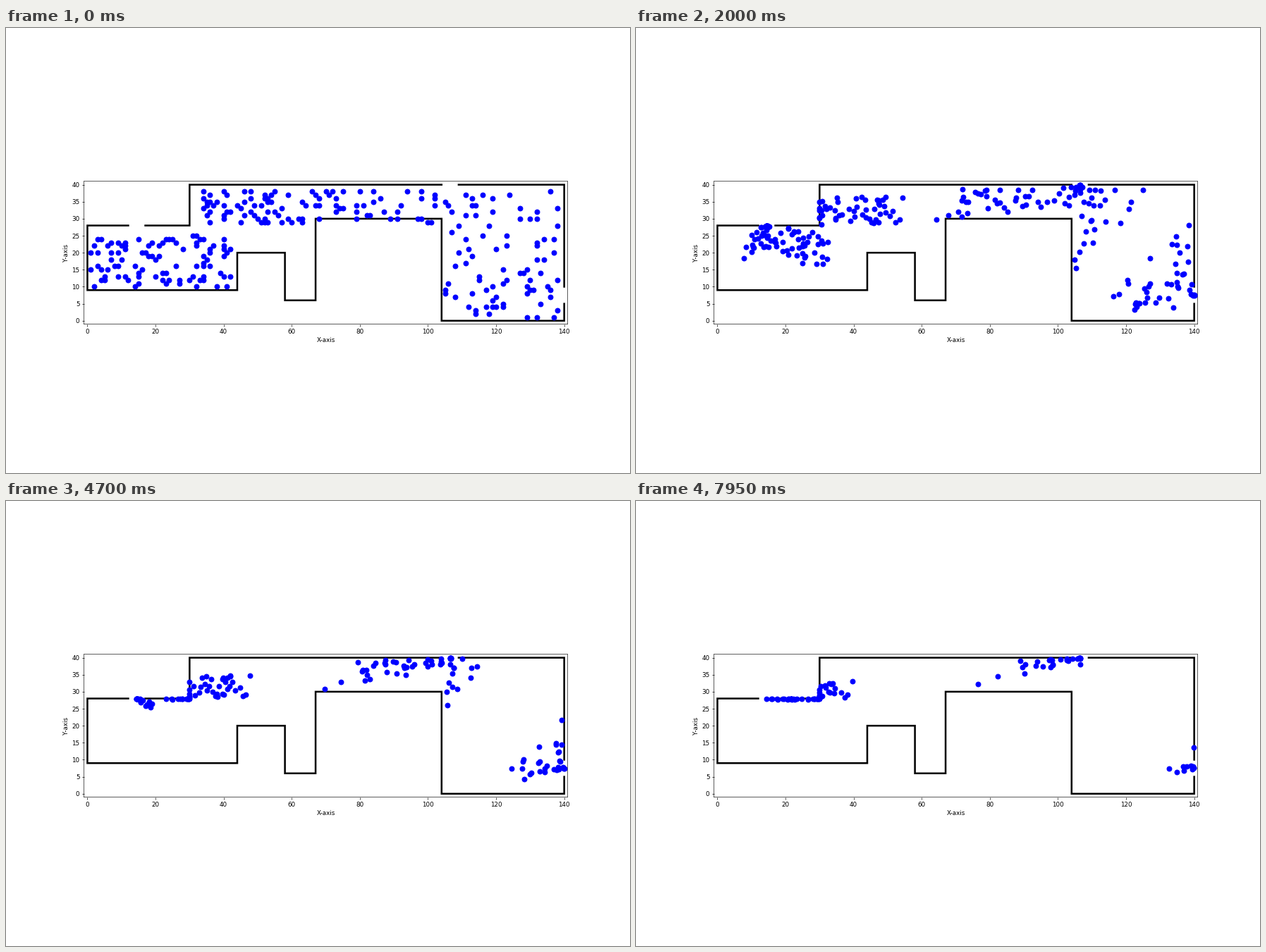
A matplotlib script for the animation above (8000 ms loop, 885 px wide and 632 px high).

```python
import numpy as np
import matplotlib.pyplot as plt
from matplotlib.animation import FuncAnimation

DPI = 63.2
FRAMES, STEP = 160, 50
DT = STEP / 1000
DOORS = np.array([(14.5, 28.0), (106.5, 40.0), (140.0, 7.5)])
WALLS = [
    [(12, 28), (0, 28), (0, 9), (44, 9), (44, 20), (58, 20), (58, 6), (67, 6),
     (67, 30), (104, 30), (104, 0), (140, 0), (140, 5)],
    [(17, 28), (30, 28), (30, 40), (104, 40)],
    [(109, 40), (140, 40), (140, 10)],
]

# Each area: walkers, x range, y range, speed range in units per second
AREAS = [
    (92, (1, 42), (10, 25), (4.8, 6.2)),
    (50, (33, 59), (29, 38), (2.5, 2.95)),
    (46, (60, 102), (29, 38), (2.0, 5.0)),
    (82, (105, 138), (1, 38), (2.0, 5.5)),
]


def nearest_door(pos):
    if 60 <= pos[0] < 104:
        return 1
    return int(np.argmin(np.hypot(*(DOORS - pos).T)))


def place(count, xs, ys, rng):
    """Distinct whole-number positions inside a rectangle."""
    width = xs[1] - xs[0] + 1
    cells = rng.choice(width * (ys[1] - ys[0] + 1), count, replace=False)
    return np.column_stack((xs[0] + cells % width, ys[0] + cells // width)).astype(float)


def walk(pos, speed, rng):
    """Positions of one walker per frame, NaN once it has left."""
    door = nearest_door(pos)
    path = np.full((FRAMES, 2), np.nan)
    wait = rng.uniform(0.1, 0.9)
    stride = speed * DT
    for i in range(FRAMES):
        path[i] = pos
        gap = DOORS[door] - pos
        dist = np.hypot(*gap)
        noise = rng.normal(0, 0.04, 2)
        if dist < 0.45:
            wait -= DT
            if wait < 0:
                break
            new = pos + 0.2 * gap + noise
        else:
            new = pos + gap / dist * min(stride, dist) + noise
            # Slide down the corridor's end wall until the room below opens
            if new[0] < 30 <= pos[0] and pos[1] > 28:
                new = np.array([30, max(pos[1] - stride, 28)])
        pos = np.minimum(new, (140, 28 if new[0] < 30 else 40))
    return path


rng = np.random.default_rng(12)
paths = np.array([walk(start, rng.uniform(*speeds), rng)
                  for count, xs, ys, speeds in AREAS
                  for start in place(count, xs, ys, rng)])

fig, ax = plt.subplots(figsize=(885.01 / DPI, 632.01 / DPI), dpi=DPI)
ax.set_aspect("equal")
ax.set_xlim(-1, 141)
ax.set_ylim(-1, 41)
ax.set_xticks(range(0, 141, 20))
ax.set_yticks(range(0, 41, 5))
ax.set_xlabel("X-axis")
ax.set_ylabel("Y-axis")
for spine in ax.spines.values():
    spine.set(snap=False, linewidth=0.72)
for wall in WALLS:
    ax.plot(*zip(*wall), color="black", lw=2.88, solid_joinstyle="miter", snap=False)
dots = ax.scatter([], [], s=64, color="blue", linewidths=1, zorder=3)


def draw(i):
    dots.set_offsets(paths[:, i])
    return dots,


anim = FuncAnimation(fig, draw, frames=FRAMES, interval=STEP,
                     init_func=lambda: draw(0), repeat=True, repeat_delay=0)
plt.show()
```
